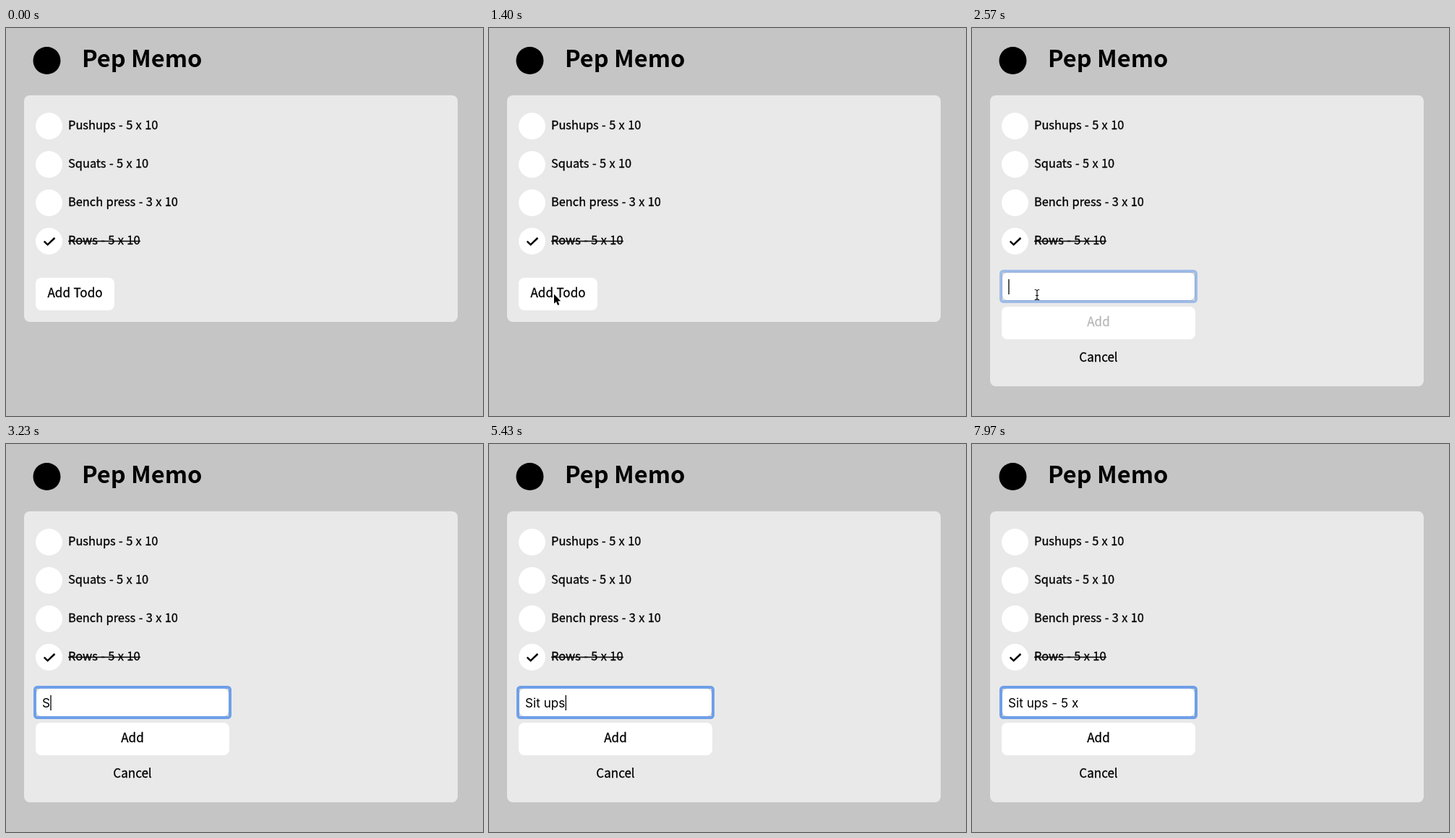
Write an HTML page that moves like this. It is 660x536 px and loops after 8000 ms.

```html
<!DOCTYPE html>
<html lang="en">
<head>
<meta charset="utf-8">
<title>Workout list</title>
<style>
  html, body { margin: 0; width: 100%; height: 100%; overflow: hidden; background: #c5c5c5; }
  svg { display: block; width: 660px; height: 536px; }
  text { font: 500 16.4px "Noto Sans CJK JP", "Noto Sans CJK SC", "Noto Sans CJK", "Noto Sans", sans-serif; }
  .label { stroke: #000; stroke-width: .3px; word-spacing: .7px; }
  .title { font-size: 32.5px; font-weight: 700; }
  .mid { text-anchor: middle; font-size: 17px; }
  #typed { font: 400 17.2px Inter, "Liberation Sans", sans-serif; white-space: pre; }
</style>
</head>
<body>
<svg viewBox="0 0 660 536">
  <rect width="660" height="536" fill="#c5c5c5"/>
  <circle cx="56.5" cy="45" r="19"/>
  <text class="title" x="105" y="54">Pep Memo</text>
  <rect id="panel" x="25" y="93" width="600" height="313" rx="8" fill="#e9e9e9"/>
  <g id="list"></g>
  <path d="M52.7 294.6l4.9 4.7 9.8-9.3" fill="none" stroke="#000" stroke-width="2.5"/>
  <path d="M86 294.5h100" stroke="#000" stroke-width="1.3"/>

  <g id="closed">
    <rect x="41" y="345" width="109" height="45" rx="8" fill="#fff"/>
    <text class="label mid" x="95.5" y="372">Add Todo</text>
  </g>

  <g id="form">
    <rect x="41.5" y="337.5" width="267" height="39" rx="7" fill="#fff" stroke="#bdbdbd"/>
    <rect id="ring" x="40" y="336" width="270" height="42" rx="3.5" fill="none" stroke="#6f9fe8" stroke-width="4"/>
    <text id="typed" x="50" y="364"></text>
    <rect id="caret" y="347" width="1.3" height="21"/>
    <rect x="41" y="385" width="268" height="45" rx="8" fill="#fff"/>
    <text id="add" class="label mid" x="175" y="412">Add</text>
    <text class="label mid" x="175" y="461">Cancel</text>
  </g>

  <path id="arrow" d="M0 0V13L3 10.3 5.1 15.2 7.3 14.2 5.3 9.5H9.2Z" stroke="#fff" stroke-width="1.6" stroke-linejoin="round" paint-order="stroke"/>
  <path id="beam" d="M86.8 361.5q3.2 0 3.2 2v10q0 2-3.2 2M93.2 361.5q-3.2 0-3.2 2v10q0 2 3.2 2M88 369.5h4" fill="none" stroke="#000" stroke-width="1.1"/>
</svg>
<script>
const LOOP = 8000;
const $ = id => document.getElementById(id);
const clamp = v => Math.min(1, Math.max(0, v));
const show = (id, on) => $(id).setAttribute("visibility", on ? "visible" : "hidden");

const rows = ["Pushups - 5 x 10", "Squats - 5 x 10", "Bench press - 3 x 10", "Rows - 5 x 10"];
$("list").innerHTML = rows.map((row, i) =>
  `<circle cx="59.5" cy="${135.5 + 53 * i}" r="18.5" fill="#fff"/>
   <text class="label" x="86" y="${140 + 53 * i}">${row}</text>`).join("");

const phrase = "Sit ups - 5 x";
// Time at which each character of the phrase is typed.
const keys = [3000, 3700, 4270, 4670, 4970, 5300, 5430, 5800, 5970, 6230, 6970, 7100, 7600];
// Spans in which the caret is blinked off.
const blinks = [[6530, 6970], [7300, 7600], [7700, LOOP]];

function render(t) {
  const open = t >= 1800;
  show("closed", !open);
  show("form", open);
  $("panel").setAttribute("height", open ? 402 : 313);

  const move = 1 - (1 - clamp((t - 770) / 630)) ** 2.2;
  $("arrow").setAttribute("transform", `translate(${-8 + 98 * move} ${471 - 103.3 * move})`);
  show("arrow", t >= 800 && !open);
  show("beam", open && t < 3000);

  const focused = t >= 2570;
  $("ring").setAttribute("opacity", focused ? (t < 2670 ? 0.6 : 1) : 0);
  const text = phrase.slice(0, keys.filter(k => t >= k).length);
  if ($("typed").textContent !== text) $("typed").textContent = text;
  const width = text ? $("typed").getComputedTextLength() : 0;
  $("caret").setAttribute("x", 50.3 + width);
  show("caret", focused && !blinks.some(([a, b]) => t >= a && t < b));

  const grey = Math.round(184 * (1 - clamp((t - 2970) / 260)));
  const tone = `rgb(${grey},${grey},${grey})`;
  $("add").style.fill = $("add").style.stroke = tone;
}

const start = performance.now();
function tick() {
  render((performance.now() - start) % LOOP);
  requestAnimationFrame(tick);
}
tick();
</script>
</body>
</html>
```
